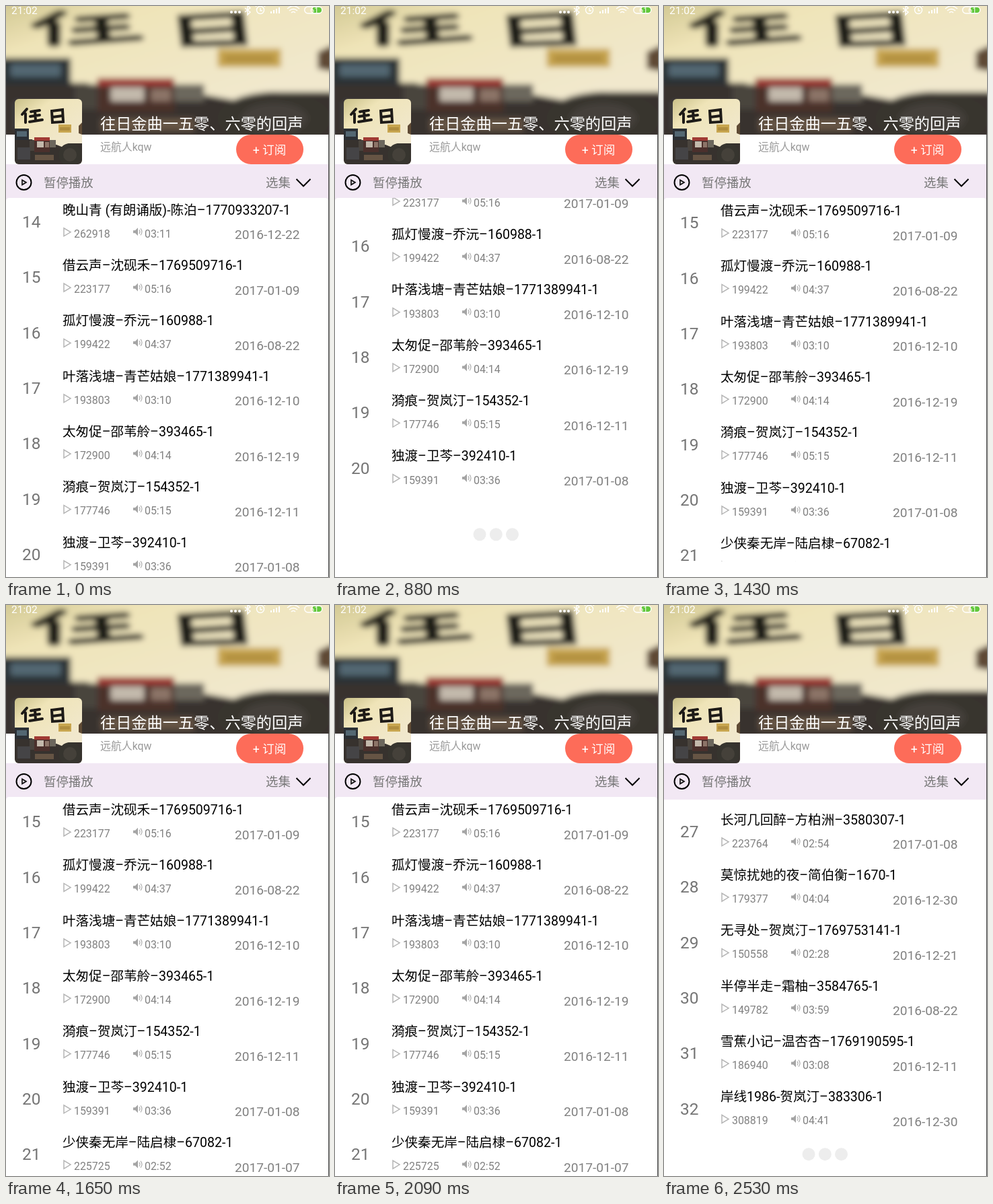
Recreate the animation shown at these times as an HTML page. Size 480 by 848 pixels, loop 2.64 s.

```html
<!DOCTYPE html>
<html lang="zh-CN">
<head>
<meta charset="utf-8">
<title>播放列表</title>
<style>
  html, body { margin: 0; width: 100%; height: 100%; overflow: hidden; background: #fff; }
  svg { display: block; }
  text { font-family: Roboto, "Noto Sans CJK SC", "Noto Sans CJK", sans-serif; white-space: pre; }
  .line { fill: none; stroke: #000; stroke-width: 2; }
  .white { fill: none; stroke: #fff; stroke-width: 1.4; }
  .label { font-size: 18.4px; fill: #777; }
  .number { font-size: 24.44px; fill: #757575; text-anchor: middle; }
  .title { font-size: 19.56px; fill: #000; }
  .small { font-size: 15.9px; fill: #808080; }
  .date { font-size: 19.1px; fill: #808080; }
</style>
</head>
<body>
<svg id="stage" width="480" height="848" viewBox="0 0 480 848">
  <defs>
    <linearGradient id="wall" x2=".6" y2=".8">
      <stop offset="0" stop-color="#c9c088"/>
      <stop offset=".35" stop-color="#efe4b8"/>
      <stop offset="1" stop-color="#f1e8cd"/>
    </linearGradient>
    <filter id="blur" x="-5%" y="-5%" width="110%" height="110%"><feGaussianBlur stdDeviation="4.5"/></filter>
    <clipPath id="banner"><rect width="480" height="191"/></clipPath>
    <clipPath id="listArea"><rect y="285" width="480" height="563"/></clipPath>
    <clipPath id="cover"><rect x="13" y="138" width="100" height="97" rx="6"/></clipPath>

    <g id="photo">
      <rect width="100" height="97" fill="url(#wall)"/>
      <path d="M18 15l-7 8M16 22V35M24 19l13-2M23 26l14-2M30 18l1 14M22 34l19-3M55 18l16-2 1 18-16 1ZM56 27l15-2"
            fill="none" stroke="#1d1a17" stroke-width="4" stroke-linecap="round"/>
      <rect x="65" y="38" width="19" height="12" fill="#c8a650"/>
      <rect x="67" y="42" width="15" height="5" fill="#b18f40"/>
      <path d="M95 40l5-5V53l-5-2Z" fill="#5f4a34"/>
      <path d="M0 60H26L30 68H62L72 72 80 66H100V97H0Z" fill="#37322e"/>
      <rect y="44" width="21" height="17" fill="#2b3035"/>
      <rect x="3" y="48" width="15" height="8" fill="#536772"/>
      <rect x="22" y="61" width="8" height="16" fill="#4a443e"/>
      <rect x="29" y="57" width="23" height="22" fill="#4b302c"/>
      <rect x="29" y="57" width="23" height="5" fill="#a03a34"/>
      <rect x="33" y="63" width="10" height="9" fill="#c3b9ac"/>
      <rect x="45" y="64" width="6" height="8" fill="#8c7468"/>
      <rect x="52" y="61" width="9" height="11" fill="#6c675d"/>
      <rect x="4" y="72" width="19" height="18" fill="#454446"/>
      <rect x="30" y="83" width="28" height="8" fill="#665444"/>
      <circle cx="82" cy="83" r="17" fill="#37352f"/>
      <circle cx="82" cy="83" r="10" fill="#45413a"/>
    </g>
  </defs>

  <rect width="480" height="848" fill="#fff"/>

  <g clip-path="url(#listArea)">
    <g id="rows"></g>
    <rect id="footer" width="480" height="80" fill="#fff"/>
    <g id="dots" fill="#ededed">
      <circle cx="215" r="9.5"/><circle cx="239.3" r="9.5"/><circle cx="263.5" r="9.5"/>
    </g>
  </g>

  <g clip-path="url(#banner)">
    <g filter="url(#blur)"><use href="#photo" transform="translate(-8 -24) scale(4.96 2.3)"/></g>
  </g>
  <g clip-path="url(#cover)"><use href="#photo" x="13" y="138"/></g>

  <g fill="#fff">
    <text x="8" y="12" font-size="15.5">21:02</text>
    <circle cx="335" cy="9" r="2"/><circle cx="341" cy="9" r="2"/><circle cx="347" cy="9" r="2"/>
    <path d="M393 11v-3h2v3zM397 11V6h2v5zM401 11V4h2v7zM405 11V2h2v9z"/>
    <path class="white" d="M355 3l8 6-4 4V-1l4 4-8 6"/>
    <circle class="white" cx="378" cy="6" r="5.5"/>
    <path class="white" d="M378 3v4h3M371 1l3-3M385 1l-3-3M418 4q9-8 18 0M421 7q6-5 12 0M424 10q3-3 6 0"/>
    <rect class="white" x="443.7" y="1" width="26" height="10" rx="5"/>
    <path d="M456 2h9a4 4 0 0 1 0 8h-9z" fill="#62c83c"/>
    <text x="452" y="10" font-size="11">61</text>
    <text x="140" y="183" font-size="23.2">往日金曲一五零、六零的回声</text>
  </g>

  <text x="140" y="214.5" font-size="15.9" fill="#999">远航人kqw</text>
  <rect x="342" y="191" width="100" height="44" rx="22" fill="#fd6c59"/>
  <text x="391.5" y="220" font-size="17.6" fill="#fff" text-anchor="middle">+ 订阅</text>

  <path id="bar" fill="#f2e8f4"/>
  <circle class="line" cx="26.5" cy="262" r="11"/>
  <path class="line" d="M24 258.5v7l6-3.5z" style="stroke-width:1.6"/>
  <text class="label" x="56" y="269">暂停播放</text>
  <text class="label" x="386" y="269">选集</text>
  <path class="line" d="M431.5 257l10.5 10.5 10.5-10.5"/>
  <rect x="479" y="191" width="1" height="657" fill="#444"/>
</svg>

<script>
const LOOP = 2640, STEP = 110, PITCH = 82.33, FIRST = 14, LIST_TOP = 273.3, BOTTOM = 848;

// title | plays | duration | date
const songs = `晚山青 (有朗诵版)-陈泊–1770933207-1|262918|03:11|2016-12-22
借云声–沈砚禾–1769509716-1|223177|05:16|2017-01-09
孤灯慢渡–乔沅–160988-1|199422|04:37|2016-08-22
叶落浅塘–青芒姑娘–1771389941-1|193803|03:10|2016-12-10
太匆促–邵苇舲–393465-1|172900|04:14|2016-12-19
漪痕–贺岚汀–154352-1|177746|05:15|2016-12-11
独渡–卫芩–392410-1|159391|03:36|2017-01-08
少侠秦无岸–陆启棣–67082-1|225725|02:52|2017-01-07
浅巷灯–乔沅–160412-1|168203|04:08|2016-12-18
旧桥细雨–邵苇舲–393521-1|174520|03:47|2016-12-25
青檐下–沈砚禾–1769512208-1|181346|04:21|2017-01-03
隔岸晚钟–卫芩–392733-1|163915|03:29|2016-12-14
南窗月–陈泊–1770935418-1|190277|04:02|2016-12-28
长河几回醉–方柏洲–3580307-1|223764|02:54|2017-01-08
莫惊扰她的夜–简伯衡–1670-1|179377|04:04|2016-12-30
无寻处–贺岚汀–1769753141-1|150558|02:28|2016-12-21
半停半走–霜柚–3584765-1|149782|03:59|2016-08-22
雪蕉小记–温杏杏–1769190595-1|186940|03:08|2016-12-11
岸线1986-贺岚汀–383306-1|308819|04:41|2016-12-30`.split("\n").map(line => line.split("|"));

const byId = id => document.getElementById(id);
const rows = byId("rows"), dots = byId("dots"), footer = byId("footer"), bar = byId("bar");

rows.innerHTML = songs.map(([title, plays, length, date], i) => `
  <g transform="translate(0 ${i * PITCH})">
    <text class="number" x="37.7" y="55.6">${FIRST + i}</text>
    <text class="title" x="84" y="36.3">${title}</text>
    <path d="M86 56.5v12l10-6z" fill="none" stroke="#b5b5b5" stroke-width="1.5"/>
    <text class="small" x="101" y="70.4">${plays}</text>
    <path d="M189 60h3l4-4v12l-4-4h-3z" fill="#a5a5a5"/>
    <path d="M198 59q2 3 0 6M200 57q4 5 0 10" fill="none" stroke="#b0b0b0" stroke-width="1.2"/>
    <text class="small" x="206" y="70.4">${length}</text>
    <text class="date" x="340" y="73">${date}</text>
  </g>`).join("");

const progress = (t, from, to) => Math.min(1, Math.max(0, (t - from) / (to - from)));
const easeOut = (p, power) => 1 - (1 - p) ** power;

// Pull past the end, settle at the loading height, then fling to the new end.
const scrollAt = t =>
  147 * easeOut(progress(t, 440, 1100), 1.87) -
  66 * easeOut(progress(t, 1100, 1320), 2) +
  973.3 * easeOut(progress(t, 2090, 2530), 1.7);

function draw(t) {
  const scroll = scrollAt(t);
  const loaded = t >= 1430;
  const count = loaded ? songs.length : 7;
  const top = LIST_TOP - scroll;
  const end = top + count * PITCH;

  rows.setAttribute("transform", `translate(0 ${top})`);
  [...rows.children].forEach((row, i) => row.style.display = i < count ? "" : "none");

  // The loading footer slides away over the newly added rows.
  footer.setAttribute("y", 768 + 80 * progress(t, 1320, 1475));
  footer.style.display = loaded ? "" : "none";
  dots.setAttribute("transform", `translate(0 ${(end + BOTTOM) / 2})`);
  dots.style.display = end < BOTTOM - 2 ? "" : "none";

  // A row edge just below the bar leaves a narrow gap; otherwise the list corners are rounded.
  const gap = (((top - 285) % PITCH) + PITCH) % PITCH;
  bar.setAttribute("d", gap < 7
    ? "M0 235H479V289H0Z"
    : "M0 235H479V290Q479 285 474 285H5Q0 285 0 290Z");
}

function tick() {
  draw(Math.floor(performance.now() % LOOP / STEP) * STEP);
  requestAnimationFrame(tick);
}
tick();
</script>
</body>
</html>
```
